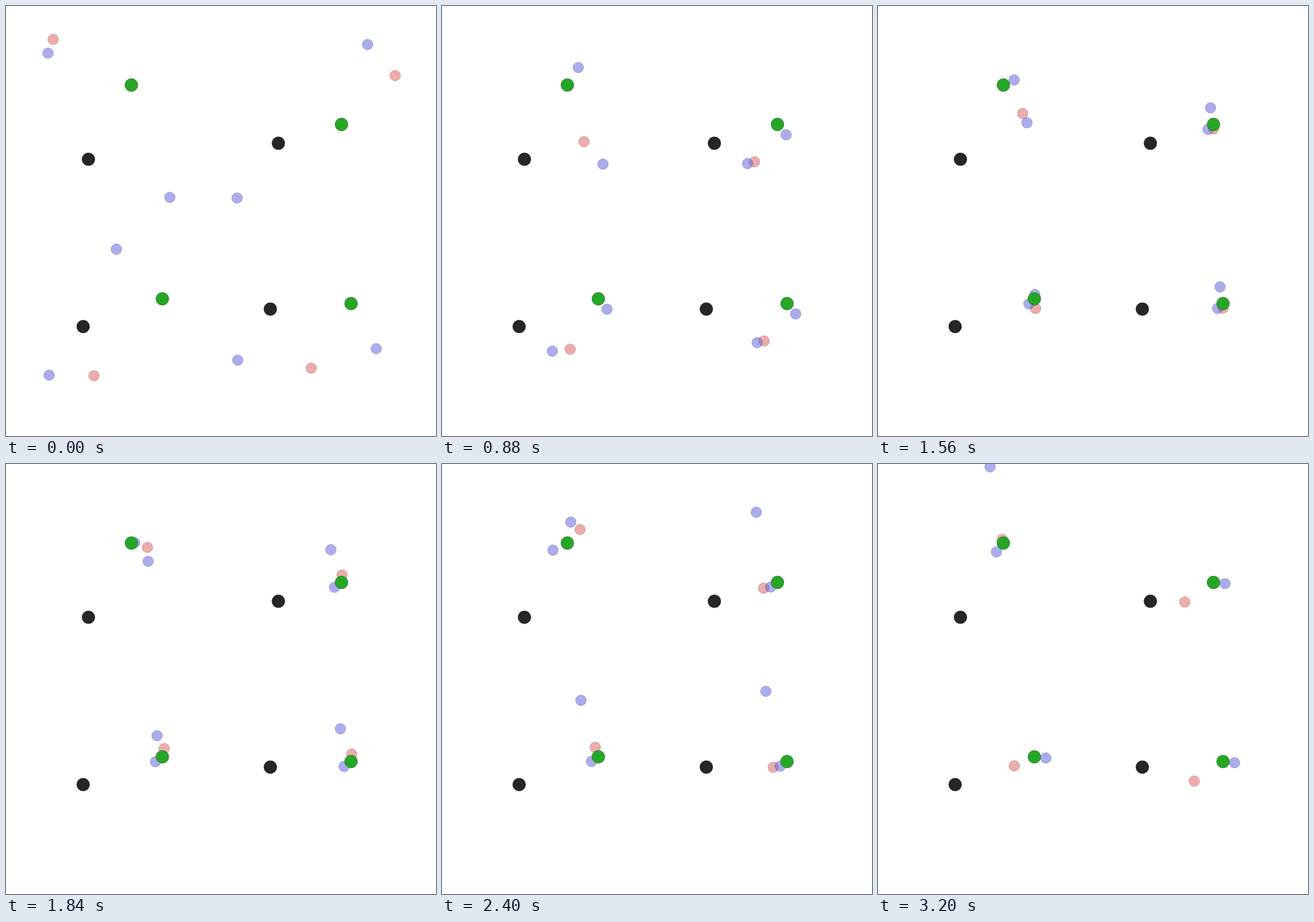
These frames come from a looping animation (748x748 px, 3.24 s). An HTML page with a canvas:

```html
<!DOCTYPE html>
<html lang="en">
<head>
<meta charset="utf-8">
<title>Agents and landmarks</title>
<style>
html, body { margin: 0; width: 100%; height: 100%; overflow: hidden; background: #fff; }
canvas { display: block; }
</style>
</head>
<body>
<canvas id="stage" width="748" height="748"></canvas>
<script>
const ctx = document.getElementById('stage').getContext('2d');
const SIZE = 748, HALF = SIZE / 2, UNIT = HALF / 2;
const STEP = 40, LOOP = 3240;
const RED = [217, 89, 89], BLUE = [89, 89, 217];
const DARK = [38, 38, 38], GREEN = [38, 166, 38];

// Habits shared between panels: [step, dx, dy] measured from the green goal.
const CIRCLE = [[22, -40, 65], [32, -6, 38], [46, 1, -13], [60, -24, 10], [80, -50, 34]];
const HOVER = [[22, 15, 18], [32, -6, 9], [60, -12, 8], [80, 20, 2]];
const FLYBY = [[22, -52, 68], [32, 0, 3], [46, -18.5, -57], [90, -76, -274]];

// Agents start from rest against drag, so early time runs slower.
const ramp = n => n - 3 * (1 - Math.pow(0.75, n));

function slopes(ts, vs) {
  const h = [], d = [], m = [];
  const last = ts.length - 1;
  for (let i = 0; i < last; i++) {
    h[i] = ts[i + 1] - ts[i];
    d[i] = (vs[i + 1] - vs[i]) / h[i];
  }
  for (let i = 1; i < last; i++) {
    const a = d[i - 1], b = d[i];
    const mean = (h[i] * a + h[i - 1] * b) / (h[i - 1] + h[i]);
    if (a * b <= 0) m[i] = 0.4 * mean;
    else m[i] = Math.sign(a) * Math.min(Math.abs(mean), 2.5 * Math.abs(a), 2.5 * Math.abs(b));
  }
  m[0] = 1.5 * d[0] - 0.5 * m[1];
  m[last] = 1.5 * d[last - 1] - 0.5 * m[last - 1];
  return m;
}

function curve(ts, vs) {
  const m = slopes(ts, vs);
  return t => {
    let i = 0;
    while (i < ts.length - 2 && t > ts[i + 1]) i++;
    const h = ts[i + 1] - ts[i], s = (t - ts[i]) / h, r = 1 - s;
    return r * r * ((1 + 2 * s) * vs[i] + s * h * m[i]) +
           s * s * ((3 - 2 * s) * vs[i + 1] - r * h * m[i + 1]);
  };
}

function agent(color, points) {
  const ts = points.map(p => ramp(p[0]));
  return {
    color,
    x: curve(ts, points.map(p => p[1])),
    y: curve(ts, points.map(p => p[2]))
  };
}

const around = ([x, y], habit, lag = 0) =>
  habit.map(([n, dx, dy]) => [n + lag, x + dx, y + dy]);

function panel(left, top, dark, green, makeAgents) {
  return { left, top, dark, green, agents: makeAgents(green) };
}

const panels = [
  panel(0, 0, [143.4, 266.6], [218.1, 137.5], () => [
    agent(RED, [[0, 82, 58], [11, 175, 196], [22, 247, 236], [32, 255, 225],
      [46, 246, 145], [60, 240, 114], [80, 216, 131]]),
    agent(BLUE, [[0, 73, 82], [11, 249, 121], [22, 237, 107], [32, 242, 120],
      [46, 224, 137], [56, 195, 148], [80, 206, 153]]),
    agent(BLUE, [[0, 285, 333], [22, 280, 275], [60, 224, 101], [80, 195, 5]])
  ]),
  panel(HALF, 0, [473.8, 238.8], [583.6, 206], goal => [
    agent(RED, [[0, 677, 121], [11, 536, 233], ...around(goal, CIRCLE)]),
    agent(BLUE, [[0, 629, 67], [11, 645, 201], ...around(goal, HOVER)]),
    agent(BLUE, [[0, 402, 334], ...around(goal, FLYBY)])
  ]),
  panel(0, HALF, [134.2, 557.6], [272, 509.4], goal => [
    agent(RED, [[0, 153, 643], [22, 223, 597], [32, 270, 566], [46, 275, 495], [80, 237, 525]]),
    agent(BLUE, [[0, 192, 423], [11, 308, 542], ...around(goal, HOVER)]),
    agent(BLUE, [[0, 75, 642], ...around(goal, FLYBY, 5)])
  ]),
  panel(HALF, HALF, [459.8, 527.2], [600.2, 517.6], goal => [
    agent(RED, [[0, 531, 630], [11, 512, 602], ...around(goal, CIRCLE)]),
    agent(BLUE, [[0, 644, 596], [11, 631, 538], ...around(goal, HOVER)]),
    agent(BLUE, [[0, 403, 616], [11, 475, 621], ...around(goal, FLYBY)])
  ])
];

function disc(x, y, radius, color, alpha) {
  ctx.beginPath();
  ctx.arc(x, y, radius, 0, 2 * Math.PI);
  ctx.fillStyle = `rgba(${color},${alpha})`;
  ctx.fill();
  ctx.strokeStyle = `rgba(${color.map(c => Math.round(c / 2))},${alpha / 2})`;
  ctx.stroke();
}

function draw(ms) {
  const t = ramp(Math.floor((ms % LOOP) / STEP));
  ctx.fillStyle = '#fff';
  ctx.fillRect(0, 0, SIZE, SIZE);
  ctx.lineWidth = 1;
  for (const p of panels) {
    ctx.save();
    ctx.beginPath();
    ctx.rect(p.left, p.top, HALF, HALF);
    ctx.clip();
    for (const a of p.agents) disc(a.x(t), a.y(t), 0.05 * UNIT, a.color, 0.5);
    disc(...p.dark, 0.06 * UNIT, DARK, 1);
    disc(...p.green, 0.06 * UNIT, GREEN, 1);
    ctx.restore();
  }
}

const start = performance.now();
function tick() {
  draw(performance.now() - start);
  requestAnimationFrame(tick);
}
draw(0);
requestAnimationFrame(tick);
</script>
</body>
</html>
```
